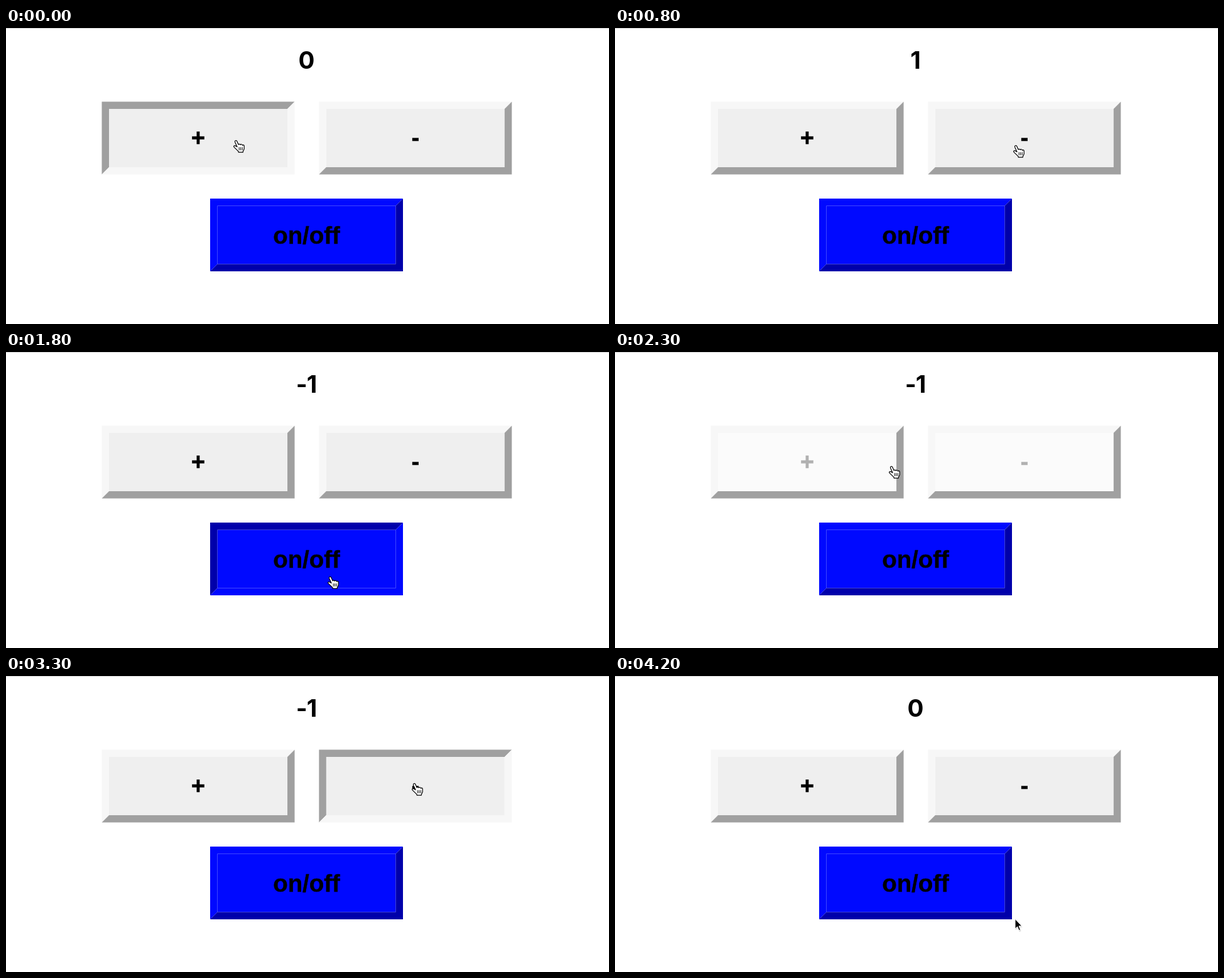
An HTML page that plays this animation: 960 px wide and 472 px high, repeating every 4680 ms.

```html
<!DOCTYPE html>
<html lang="en">
<head>
<meta charset="utf-8">
<title>Counter</title>
<style>
  html, body { margin: 0; width: 100%; height: 100%; overflow: hidden; background: #fff; }
  svg { display: block; width: 960px; height: 472px; }
  text { font-weight: 700; font-size: 38.4px; text-anchor: middle; }
  .label { font-family: "Liberation Sans", Arial, sans-serif;
    fill: currentColor; stroke: currentColor; stroke-width: .4px; }
  .count { font-family: Inter, sans-serif; letter-spacing: -1px; }
</style>
</head>
<body>
<svg viewBox="0 0 960 472">
  <rect width="960" height="1" fill="#d4d4d4"/>
  <text id="count" class="count" x="478" y="64.5">0</text>
  <g id="buttons"></g>
  <g id="hand" stroke="#000" stroke-width="1.2" stroke-linejoin="round" stroke-linecap="round">
    <path fill="#fff" d="M-.4 .5C-1.7 .9 -1.7 2.2 -1.2 3.4L2 10.6L-.6 8.9C-2.6 7.9 -4.2 9.3 -3 10.9L2.9 16.6L4.2 18.2V19.2H11.2V18.2L13.2 13.8V9.3C13.2 7.5 11.3 7 10.4 8C10 6.3 8 6 7.2 7.2C6.6 5.8 4.8 5.7 4 6.8L1.8 1.7C1.3 .6 .5 .2 -.4 .5Z"/>
    <path fill="none" stroke-width="1" d="M5.2 11.5V15.5M7.7 11.5V15.5M10.2 11.5V15.5"/>
  </g>
  <g id="arrow">
    <path opacity=".14" transform="translate(.7 1.6)" d="M0 0V16L3.5 12.7L6.1 18.8L8.9 17.6L6.3 11.7H11Z"/>
    <path stroke="#fff" d="M0 0V15.6L3.6 12.2L6.1 18.1L8.5 17.1L6 11.3H10.8Z"/>
  </g>
</svg>
<script>
const LOOP = 4680, TICK = 100, HOLD = 80;
const W = 307, H = 116, BEVEL = 11.5;
const NS = "http://www.w3.org/2000/svg";
const $ = id => document.getElementById(id);

const gray = { face: "#efefef", light: "#f7f7f7", dark: "#a0a0a0" };
const blue = { face: "#0009ff", light: "#0009ff", dark: "#0000aa" };

const plus = { x: 152.5, y: 117.5, base: 188.4, label: "+", paint: gray, step: 1 };
const minus = { x: 498.3, y: 117.5, base: 188.4, label: "-", paint: gray, step: -1 };
const power = { x: 325, y: 272, base: 344, label: "on/off", paint: blue, step: 0 };
const buttons = [plus, minus, power];

// Pointer stops: it arrives, clicks what lies below every `gap` ms, then leaves.
const stops = [
  { x: 366, y: 179, arrive: 0, leave: 500, clicks: 2, gap: 300 },
  { x: 638, y: 187, arrive: 700, leave: 1400, clicks: 3, gap: 200 },
  { x: 516, y: 358, arrive: 1800, clicks: 1 },
  { x: 348, y: 177, arrive: 2200 },
  { x: 440, y: 182, arrive: 2300 },
  { x: 588, y: 201, arrive: 2500 },
  { x: 537, y: 339, arrive: 2700, leave: 3100, clicks: 1, wait: 300 },
  { x: 650, y: 171, arrive: 3300, leave: 3400, clicks: 1 },
  { x: 369, y: 179, arrive: 3710, leave: 3900, clicks: 2, gap: 100 },
  { x: 637, y: 387.5, arrive: 4102, leave: LOOP }
];

const buttonAt = (x, y) =>
  buttons.find(b => x >= b.x && x < b.x + W && y >= b.y && y < b.y + H);

const clicks = stops.flatMap(s =>
  Array.from({ length: s.clicks || 0 }, (_, i) => ({
    button: buttonAt(s.x, s.y),
    down: s.arrive + (s.wait || 0) + i * (s.gap || 0)
  })));

function add(parent, tag, attrs) {
  const el = document.createElementNS(NS, tag);
  for (const key in attrs) el.setAttribute(key, attrs[key]);
  return parent.appendChild(el);
}

function build(b) {
  const g = add($("buttons"), "g", { transform: `translate(${b.x} ${b.y})` });
  const r = W - BEVEL, d = H - BEVEL;
  b.face = add(g, "rect", { x: BEVEL, y: BEVEL, width: r - BEVEL, height: d - BEVEL });
  b.upper = add(g, "path", { d: `M0 0H${W}L${r} ${BEVEL}H${BEVEL}V${d}L0 ${H}Z` });
  b.lower = add(g, "path", { d: `M${W} ${H}H0L${BEVEL} ${d}H${r}V${BEVEL}L${W} 0Z` });
  b.text = add(g, "text", { class: "label", x: W / 2, y: b.base - b.y });
  b.text.textContent = b.label;
}

function paint(b, down, enabled) {
  const { face, light, dark } = b.paint;
  b.upper.setAttribute("fill", down ? dark : light);
  b.lower.setAttribute("fill", down ? light : dark);
  b.face.setAttribute("fill", enabled ? face : "#fbfbfb");
  b.text.style.color = enabled ? "#000" : "#b1b1b1";
}

// Rests at a stop, then travels evenly to the next one.
function pointer(t) {
  const i = stops.findLastIndex(s => s.arrive <= t);
  const a = stops[i], b = stops[i + 1] || a;
  const leave = a.leave || a.arrive;
  const k = t <= leave ? 0 : (t - leave) / (b.arrive - leave);
  return [a.x + (b.x - a.x) * k, a.y + (b.y - a.y) * k];
}

function draw(time) {
  const t = Math.floor(time % LOOP / TICK) * TICK;
  const done = clicks.filter(c => c.down + HOLD <= t);
  const held = clicks.find(c => c.down <= t && t < c.down + HOLD);
  const on = done.filter(c => c.button === power).length % 2 === 0;

  for (const b of buttons) paint(b, held?.button === b, on || b === power);
  $("count").textContent = done.reduce((n, c) => n + c.button.step, 0);

  const [x, y] = pointer(t);
  const shown = buttonAt(x, y) ? "hand" : "arrow";
  for (const id of ["hand", "arrow"]) {
    $(id).setAttribute("transform", `translate(${x} ${y})`);
    $(id).style.display = id === shown ? "" : "none";
  }
}

buttons.forEach(build);
const start = performance.now();
function frame() {
  draw(performance.now() - start);
  requestAnimationFrame(frame);
}
frame();
</script>
</body>
</html>
```
